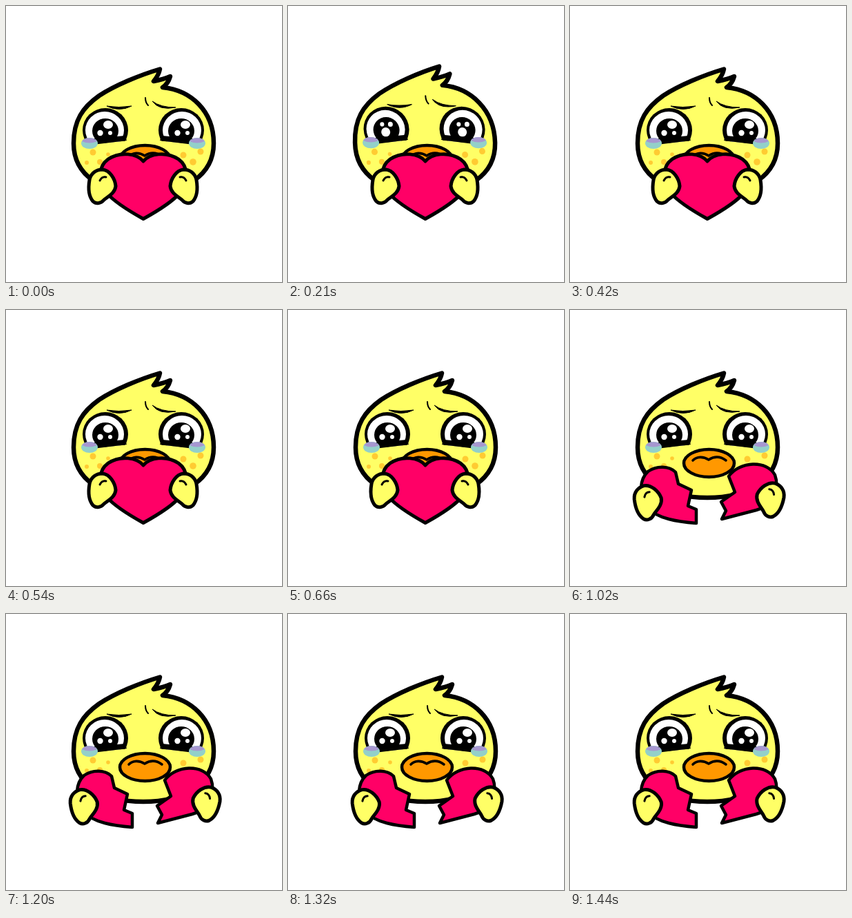
An HTML page that plays this animation: 400x400 px, repeating every 1.47 s.

```html
<!DOCTYPE html>
<html lang="en">
<head>
<meta charset="utf-8">
<title>Broken heart chick</title>
<style>
  html, body { margin: 0; width: 100%; height: 100%; overflow: hidden; background: #fff; }
  svg { display: block; width: 100vw; height: 100vh; }
  .ink { stroke: #000; stroke-width: 5; stroke-linejoin: round; }
  .line { fill: none; stroke: #000; stroke-width: 3; stroke-linecap: round; }
  .skin { fill: #ffff66; }
  .pink { fill: #ff0066; }
  .spot { fill: #ffcb32; }
</style>
</head>
<body>
<svg viewBox="0 0 400 400">
  <defs>
    <clipPath id="lid"><path d="M100 140H190V194L126 200L100 194Z"/></clipPath>
    <g id="eye">
      <g clip-path="url(#lid)">
        <ellipse cx="144" cy="180" rx="33" ry="32"/>
        <ellipse cx="143" cy="180" rx="28" ry="27" fill="#fff"/>
        <ellipse cx="144" cy="181" rx="19" ry="18"/>
      </g>
      <path d="M118 193L172 188L175 195L126 201Z"/>
    </g>
    <g id="shineA" fill="#fff">
      <ellipse cx="4" cy="-7" rx="7" ry="6"/><circle cx="-7.5" cy="5" r="4.2"/><circle cx="7" cy="5" r="3"/>
    </g>
    <g id="shineB" fill="#fff">
      <circle cx="-2" cy="4" r="6.5"/><circle cx="-7" cy="-7" r="3"/><circle cx="5" cy="-7" r="3.5"/>
    </g>
    <g id="tear">
      <ellipse rx="12" ry="8" fill="#93d0c9"/>
      <path d="M-11-3A12 8 0 0 1 11-3Q0 2-11-3Z" fill="#a697d0"/>
    </g>
    <g id="hand">
      <path class="ink skin" d="M140 237C150 238 158 250 159 261C158 272 146 277 142 281C137 287 130 287 126 283C120 276 119 264 121 252C123 242 131 237 140 237Z"/>
      <path class="line" d="M136 253C138 249 141 247 145 248"/>
    </g>
  </defs>

  <path id="body" class="ink skin" style="stroke-width:6.5"/>
  <g id="face">
    <g class="spot">
      <circle cx="126" cy="212" r="4.5"/><circle cx="136" cy="226" r="4"/>
      <circle cx="117" cy="227" r="3"/><circle cx="148" cy="215" r="2.8"/>
      <circle cx="257" cy="216" r="4.5"/><circle cx="271" cy="226" r="4.8"/>
      <circle cx="282" cy="211" r="4.5"/>
    </g>
    <use href="#eye"/>
    <use href="#eye" transform="matrix(-1 0 0 1 398 0)"/>
    <g id="calm">
      <use href="#shineA" x="144" y="179"/><use href="#shineA" x="256" y="179"/>
    </g>
    <g id="wide">
      <use href="#shineB" x="145" y="180"/><use href="#shineB" x="256" y="180"/>
    </g>
    <use href="#tear" x="121" y="199"/>
    <use href="#tear" x="277" y="199"/>
    <path d="M146 145Q163 148 182 145Q164 154 146 145ZM212 138Q224 147 246 147Q222 152 212 138Z" stroke="#000"/>
    <path class="line" style="stroke-width:2" d="M202 133Q202 140 206 144"/>
  </g>

  <ellipse class="ink" cx="201.5" cy="222" rx="36.5" ry="20" fill="#ff9800" style="stroke-width:4.5"/>
  <path class="line" style="stroke-width:3.6" d="M178 218C184 212 193 212 201 217C209 212 218 212 226 218"/>

  <path id="heart" class="ink pink" d="M199 225C190 214 166 210 148 222C134 232 132 254 146 271C158 285 180 298 199 308.5C218 298 240 285 252 271C266 254 264 232 250 222C232 210 208 214 199 225Z"/>
  <g id="halves">
    <path id="halfL" class="ink pink" style="stroke-width:4.5" d="M153 235L157 252L176 261L171 284L183 289L183 309C158 307 126 303 110 285C98 268 102 244 113 234C126 225 144 226 153 235Z"/>
    <path id="halfR" class="ink pink" style="stroke-width:4.5" d="M230 241C246 219 285 217 297 239C304 258 294 284 270 290L220 303L226 291L219 278L239 264Z"/>
  </g>
  <g id="handL"><use href="#hand"/></g>
  <g id="handR"><use href="#hand" transform="matrix(-1 0 0 1 397 0)"/></g>
</svg>
<script>
const LOOP = 1470, STEP = 30, SNAP = 780, APART = 900;
const CHIN = 231, LEAN = 0.028;
const BODY = `M98 199C98 166 111 147 135 130C158 115 194 100 223 91.5
  C222 97 219 103 214 109C224 107 231 105 238 102C236 109 233 114 227 118
  C268 122 301 152 301 199C301 246 258 272 199 272C140 272 98 246 98 199Z`;

const $ = id => document.getElementById(id);
const put = (id, x, y, turn, cx, cy) =>
  $(id).setAttribute('transform', `translate(${x} ${y}) rotate(${turn} ${cx} ${cy})`);
const show = (id, on) => $(id).style.display = on ? '' : 'none';

// Everything above the chin stretches up and to the left
const leanBody = k => BODY.replace(/([\d.]+) ([\d.]+)/g, (_, x, y) => {
  const d = k * Math.max(0, CHIN - y);
  return `${x - d} ${y - d}`;
});

function draw(time) {
  const step = Math.floor(time % LOOP / STEP), t = step * STEP;
  const shake = step % 2, k = LEAN * shake;
  const broken = t >= SNAP;
  const raw = Math.min(1, Math.max(0, (t - SNAP + STEP) / (APART - SNAP)));
  const p = raw * (2 - raw), rest = 1 - p;
  const dip = 9 * Math.sin(Math.PI * raw);
  const squeeze = broken ? 0 : 2 * shake;

  $('body').setAttribute('d', leanBody(k));
  $('face').setAttribute('transform', `matrix(1 0 ${k} ${1 + k} ${-CHIN * k} ${-CHIN * k})`);
  show('calm', !shake);
  show('wide', shake);
  show('heart', !broken);
  show('halves', broken);

  put('halfL', 14 * rest, dip, 18 * rest, 184, 309);
  put('halfR', -21 * rest, 5 * rest + dip, -18 * rest, 219, 304);
  put('handL', squeeze - 26 * p, 17 * p + dip, -16 * p, 139, 261);
  put('handR', 32 * p - squeeze, 13 * p + dip, 20 * p, 258, 261);
}

function tick() {
  draw(performance.now());
  requestAnimationFrame(tick);
}
tick();
</script>
</body>
</html>
```
